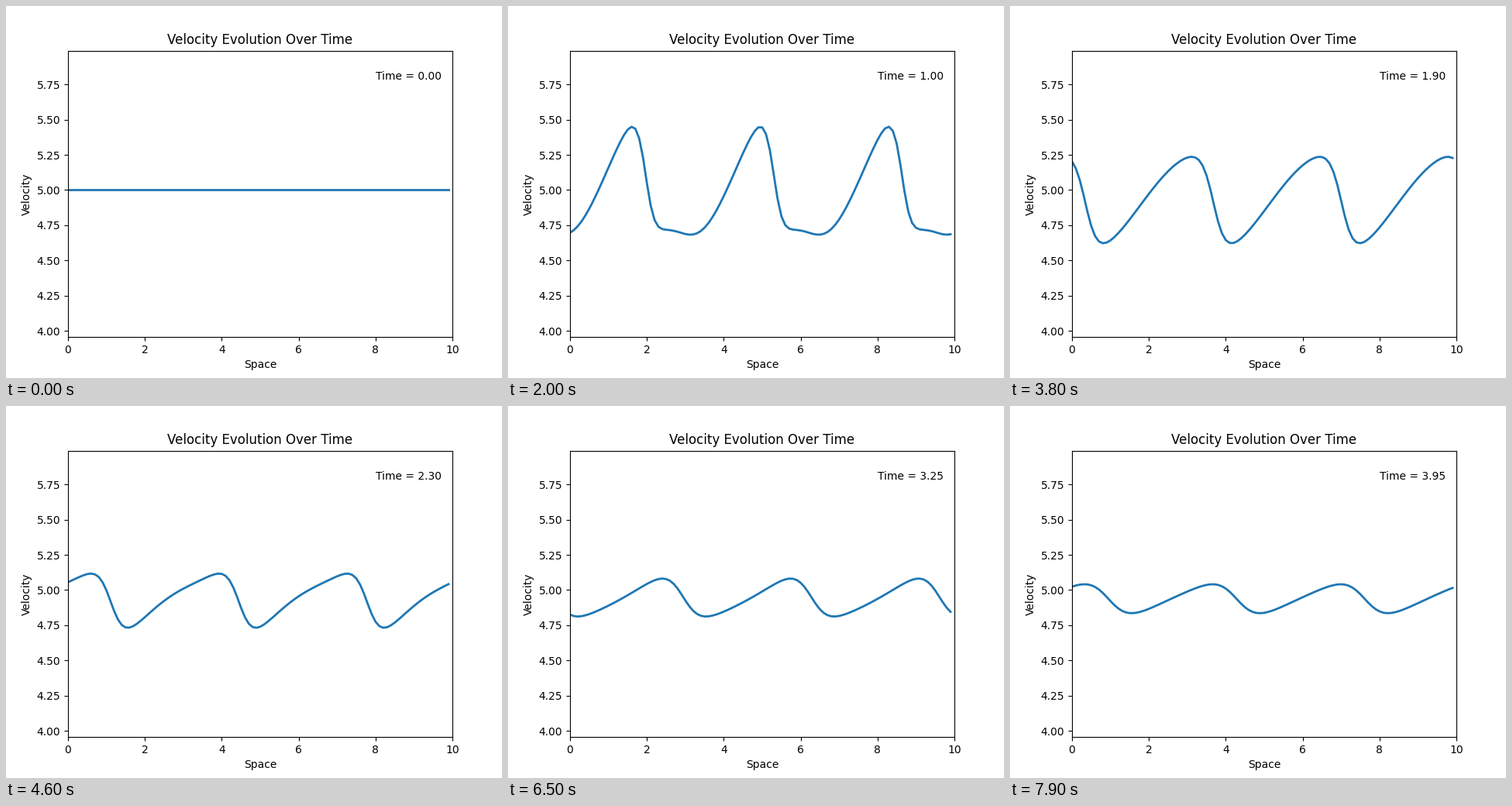
Animation, 640 px wide and 480 px high, one loop 8 s. Source, as a matplotlib script:

```python
import numpy as np
import matplotlib.pyplot as plt
from matplotlib.animation import FuncAnimation

LENGTH, DX = 10.0, 0.1
DT, STEPS = 0.0025, 20        # time step, steps per frame
FRAMES = 80
SPEED, SOUND, AMP = 5.0, 3.0, 0.4

x = np.arange(0, LENGTH, DX)


def grad(f):
    """Periodic backward difference (every wave runs to the right)."""
    return (f - np.roll(f, 1)) / DX


def solve():
    """Velocity profiles of a flow whose density starts with three waves."""
    rho = 1 + AMP * np.sin(2 * np.pi * 3 * x / LENGTH)
    u = np.full_like(x, SPEED)
    history = [u]
    for _ in range(FRAMES - 1):
        for _ in range(STEPS):
            rho, u = (rho - DT * grad(rho * u),
                      u - DT * (u * grad(u) + SOUND**2 * grad(rho)))
        history.append(u)
    return history


history = solve()

fig, ax = plt.subplots(figsize=(6.4, 4.8), dpi=100)
line, = ax.plot(x, history[0], lw=2)
label = ax.text(0.8, 0.9, "", transform=ax.transAxes)
ax.set(xlim=(0, LENGTH), ylim=(3.955, 5.99), xlabel="Space",
       ylabel="Velocity", title="Velocity Evolution Over Time")


def update(i):
    line.set_ydata(history[i])
    label.set_text(f"Time = {i * STEPS * DT:.2f}")
    return line, label


anim = FuncAnimation(fig, update, frames=FRAMES, interval=100,
                     repeat=True, repeat_delay=0)
plt.show()
```
